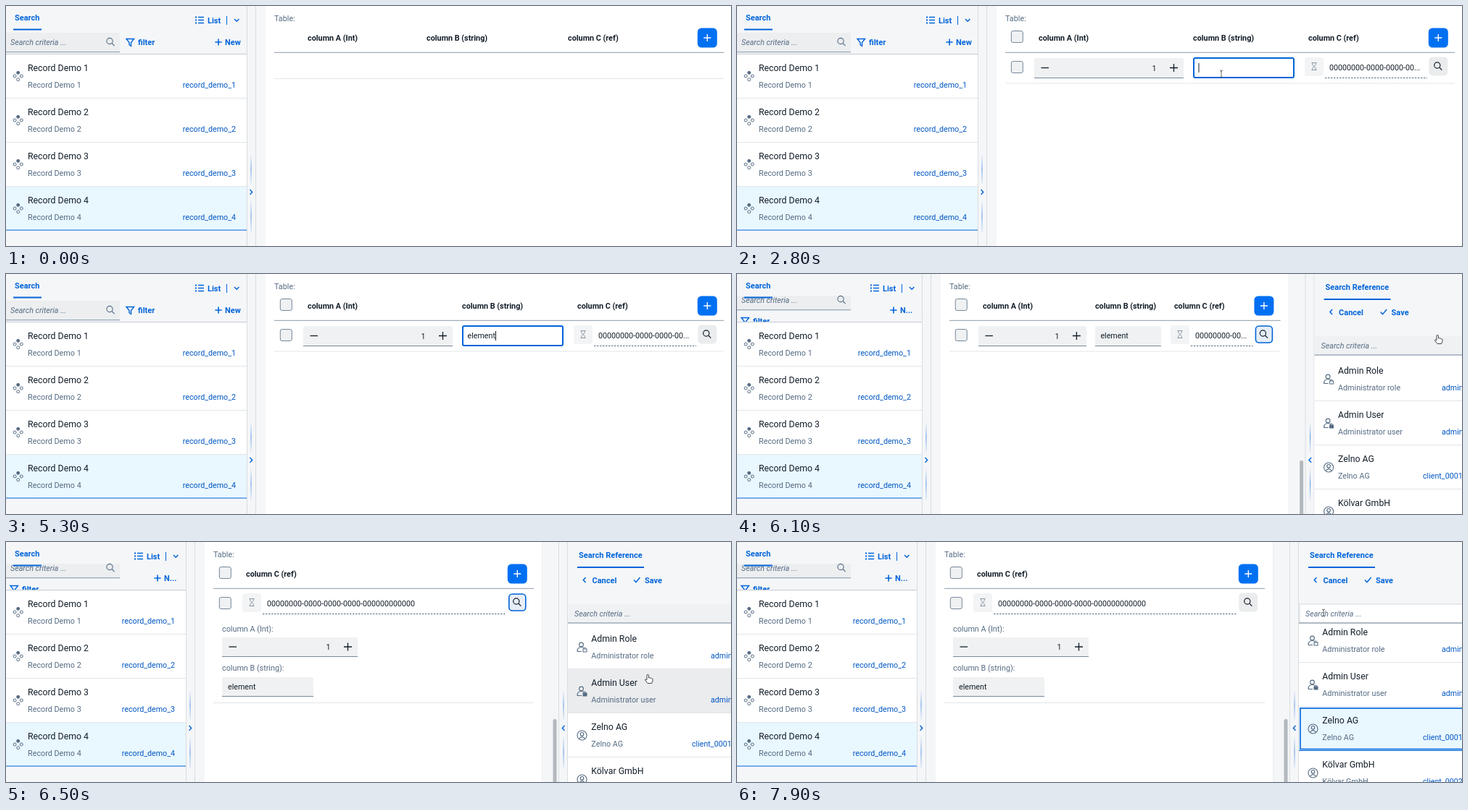
An HTML page for the animation above (8 s loop, 1000 by 332 pixels).

```html
<!DOCTYPE html>
<html lang="en">
<head>
<meta charset="utf-8">
<title>Table editor</title>
<style>
html, body { margin: 0; width: 100%; height: 100%; overflow: hidden; background: #fff; }
svg { display: block; width: 1000px; height: 332px; }
text { font: 10.7px Roboto, sans-serif; fill: #131e29; white-space: pre; }
.title { font-size: 12.3px; }
.sub { font-size: 10.8px; fill: #556b82; }
.link { fill: #0057c2; }
.bold { font-weight: 700; font-size: 10.8px; }
.action { font-weight: 700; font-size: 11px; fill: #0064d9; }
.hint { font-style: italic; fill: #556b82; }
.end { text-anchor: end; }
</style>
</head>
<body>
<svg id="stage" viewBox="0 0 1000 332"></svg>
<script>
const LOOP = 8000, STEP = 100;
const BLUE = '#0064d9', INK = '#131e29', GREY = '#556b82', PANEL = '#f5f6f8', FIELD = '#eff1f2', RULE = '#e3e5e8';
const ZEROS = '00000000-0000-0000-0000-000000000000';
const stage = document.getElementById('stage');

const clamp = v => Math.max(0, Math.min(1, v));
const mix = (a, b, p) => a + (b - a) * p;
const smooth = p => p * p * (3 - 2 * p);

const text = (x, y, s, cls = '') => `<text x="${x}" y="${y}" class="${cls}">${s}</text>`;
const rect = (x, y, w, h, fill, more = '') => `<rect x="${x}" y="${y}" width="${w}" height="${h}" fill="${fill}" ${more}/>`;
const path = (d, color = BLUE, w = 1.4, more = 'fill="none"') => `<path d="${d}" stroke="${color}" stroke-width="${w}" ${more}/>`;
const hline = (x1, x2, y, color = RULE, w = 1, more) => path(`M${x1} ${y}H${x2}`, color, w, more);
const vline = (x, y1, y2, color = RULE, w = 1) => path(`M${x} ${y1}V${y2}`, color, w);
const circle = (x, y, r, color, fill = 'none', w = 1.1) => `<circle cx="${x}" cy="${y}" r="${r}" stroke="${color}" stroke-width="${w}" fill="${fill}"/>`;
const plus = (x, y, r, color, w) => path(`M${x - r} ${y}h${2 * r}M${x} ${y - r}v${2 * r}`, color, w);
const lens = (x, y, color, w = 1.2) => circle(x - 1, y - 1, 4.1, color, 'none', w) + path(`M${x + 2} ${y + 2}l3.6 3.6`, color, w);

// Pointer stops: time, x, y, shape shown until the next stop
const stops = [
  [200, 703, 285, 'arrow'], [1000, 967, 47, 'hand'], [1225, 967, 47, 'arrow'], [2100, 604, 85, 'hand'],
  [2300, 604, 85, 'arrow'], [2700, 668, 94, 'beam'], [4600, 668, 94, ''],
  [5600, 700, 96, 'arrow'], [5800, 966, 84, 'hand'], [6150, 966, 84, 'hand'], [6500, 885, 183, 'hand'],
  [7000, 870, 281, 'hand'], [7200, 870, 281, 'hand'], [7900, 809, 98, 'beam']
];
function pointerAt(t) {
  const i = stops.findLastIndex(s => s[0] <= t);
  if (i < 0) return { x: -9, y: -9, shape: '' };
  const a = stops[i], b = stops[i + 1] || a;
  const p = smooth(clamp((t - a[0]) / (b[0] - a[0] || 1)));
  return { x: mix(a[1], b[1], p), y: mix(a[2], b[2], p), shape: a[3] };
}
const shapes = {
  arrow: path('M0 0V9.5L2.3 7.5L3.8 11L5.3 10.3L3.8 7H6.8Z', '#fff', .7, 'fill="#111"'),
  hand: path('M-1 1Q.3-.6 1.4 1V5Q3 4 3.6 5.2Q5 4.6 5.5 5.9Q7 5.6 7 7V9L5.6 12.5H0L-3.6 7.8Q-3.6 6-1 7.6Z', '#333', .9, 'fill="#fff"'),
  beam: path('M-2-5Q0-5 0-3.5Q0-5 2-5M0-4V4M-2 5Q0 5 0 3.5Q0 5 2 5', '#555', .9)
};
const pointer = m => m.shape ? `<g transform="translate(${m.x} ${m.y})">${shapes[m.shape]}</g>` : '';

function splitter(x, dir) {
  const bar = (y, h) => rect(x - .5, y, 1, h, 'url(#fade)');
  return bar(205, 41) + bar(268, 45) + path(`M${x - 1.5 * dir} 254l${3.2 * dir} 3.4l${-3.2 * dir} 3.4`, BLUE, 1.4);
}

function leftPanel(L) {
  const wrapped = L < 310, dy = wrapped ? -14 : 0;
  let s = rect(0, 0, L, 332, PANEL)
    + rect(0, 37 + dy, 157, 27, '#eceef0') + hline(0, 157, 63.7 + dy, '#8396a8')
    + rect(0, 0, L, 30, PANEL)
    + text(6, 54 + dy, 'Search criteria ...', 'hint') + lens(144, 49.5 + dy, GREY, 1.1);
  const fx = wrapped ? 6 : 166, fy = wrapped ? 65 : 50;
  s += path(`M${fx} ${fy - 4.5}h10.5l-4 5v5l-2.5-1.8v-3.2z`, BLUE, 1.4) + text(fx + 16, fy + 4, 'filter', 'action');
  s += text(12, 20, 'Search', 'action') + rect(10, 31.5, 39, 2, BLUE);
  for (const y of [15.5, 19.5, 23.5]) s += rect(L - 71, y - 1, 2, 2, BLUE) + hline(L - 67, L - 59, y, BLUE, 1.5);
  s += text(L - 54, 23.5, 'List', 'action') + vline(L - 27.5, 14, 26, BLUE, 1)
    + path(`M${L - 17} 18l3.2 3.2l3.2-3.2`, BLUE, 1.5)
    + plus(L - 39, 50, 4.6, BLUE, 1.6) + text(L - 30, 54, wrapped ? 'N...' : 'New', 'action');
  for (let i = 0; i < 4; i++) {
    const y = 66.5 + i * 61, name = `Record Demo ${i + 1}`;
    s += rect(0, y, L, 61, i == 3 ? '#e9f7ff' : '#fff') + hline(0, L, y, i ? RULE : '#c3cbd3')
      + circle(16.7, y + 25.8, 2, GREY, GREY, 1) + circle(12.1, y + 30.5, 2, GREY, 'none', 1)
      + circle(21.3, y + 30.5, 2, GREY, 'none', 1) + circle(16.7, y + 35.2, 2, GREY, 'none', 1)
      + text(30, y + 23.5, name, 'title') + text(30, y + 46, name, 'sub')
      + text(L - 15, y + 46, `record_demo_${i + 1}`, 'link end');
  }
  return s + rect(0, 310.5, L, 1, PANEL) + hline(0, L, 310, BLUE) + rect(L, 0, 26, 332, PANEL)
    + vline(L + .5, 0, 332, '#d9dde1') + vline(L + 12.5, 0, 332, '#d9dde1') + splitter(L + 6, 1);
}

const checkbox = (x, y) => rect(x - 8, y - 8, 16, 16, FIELD, 'rx="2.5" stroke="#75879a"');
const input = (x, y, w, h, focus) => focus
  ? rect(x + 1, y, w - 2, h - 1, '#fff', `rx="2" stroke="${BLUE}" stroke-width="2"`)
  : rect(x, y, w, h, FIELD, 'rx="2"') + hline(x, x + w, y + h - .5, '#75879a');
const stepper = (x, y, w, h, value, focus) => {
  const cy = y + h / 2 - .5, end = x + w - 13.5;
  return input(x, y, w, h, focus) + hline(x + 9.5, x + 20, cy, INK, 1.3)
    + text(end - 24, cy + 4, value, 'end') + plus(end, cy, 5.5, INK, 1.3);
};
const hourglass = x => rect(x, 71, 26, 26, '#f3f4f5', 'rx="4"')
  + path(`M${x + 9.5} 78.5h7M${x + 9.5} 88.5h7M${x + 10.5} 79q0 3 2.5 4.5q-2.5 1.5-2.5 4.5M${x + 15.5} 79q0 3-2.5 4.5q2.5 1.5 2.5 4.5`, '#8b98a5', 1);
const addButton = (x, focus) => (focus
  ? rect(x - 13, 31, 26, 26, '#fff', `rx="5.5" stroke="${BLUE}" stroke-width="1.4"`) + rect(x - 11.3, 32.7, 22.6, 22.6, BLUE, 'rx="4"')
  : rect(x - 13.5, 30.5, 27, 27, '#0070f2', 'rx="5.5"')) + plus(x, 44, 5, '#fff', 1.4);
const lookup = (x, focus) => (focus
  ? rect(x - 11.5, 72, 23, 23, '#e6edf4', `rx="4.5" stroke="${BLUE}" stroke-width="1.6"`)
  : rect(x - 13, 70.5, 26, 26, '#eaecee', 'rx="5"')) + lens(x - .5, 83, INK, 1.2);

function typed(t) {
  const times = [3600, 3700, 3800, 4100, 4200, 4200, 4300];
  return 'element'.slice(0, times.filter(k => k <= t).length);
}
const advance = { e: 5.7, l: 2.6, m: 9.4, n: 5.9, t: 3.5 };

function table(t, L, R, k) {
  const C = L + 26, end = R - 47, x0 = C + 12;
  let s = rect(C, 0, R - 35 - C, 332, '#fff') + text(x0, 21.3, 'Table:', 'sub')
    + hline(x0, end, 64.3, '#a3adb8', 1.2) + addButton(end - 22.7, t >= 1100 && t < 2200);
  if (t < 1300) return s + text(416, 48, 'column A (Int)', 'bold') + text(580, 48, 'column B (string)', 'bold')
    + text(775, 48, 'column C (ref)', 'bold') + hline(x0, end, 100.5);

  s += checkbox(C + 28.3, 42.5) + checkbox(C + 28.3, 84.5) + lookup(end - 22.7, t >= 5800 && t < 7200);
  const value = t < 2200 ? 0 : 1, word = typed(t);
  if (k > .95) return s + text(C + 57, 48, 'column C (ref)', 'bold') + hourglass(C + 52)
    + text(C + 86, 89, ZEROS) + hline(C + 80, end - 38, 99.5, GREY, 1, 'stroke-dasharray="2.5 1.5"')
    + text(C + 24, 124, 'column A (Int):', 'sub') + stepper(C + 24, 132, 187, 27, value)
    + text(C + 24, 178, 'column B (string):', 'sub') + input(C + 24, 187, 126, 27) + text(C + 32, 203.5, word)
    + hline(x0, end, 222.5);

  const q = k / .917, bx = mix(629, 494, q), cx = mix(783, 598, q), focus = t >= 2700 && t < 5700;
  const room = end - 38 - cx - 34, count = Math.floor((room - 13) / 5.8);
  s += text(C + 58, 48, 'column A (Int)', 'bold') + text(bx, 48, 'column B (string)', 'bold') + text(cx + 5, 48, 'column C (ref)', 'bold')
    + stepper(C + 52, 72, mix(206, 149, q), 28, value, t >= 2200 && t < 2700)
    + input(bx, 72, mix(140, 91, q), 28, focus) + text(bx + 7.5, 89, word)
    + hourglass(cx) + text(cx + 34, 89, ZEROS.slice(0, count) + '...')
    + hline(cx + 28, end - 38, 99.5, GREY, 1, 'stroke-dasharray="2.5 1.5"') + hline(x0, end, 107);
  const caretOn = focus && !(t >= 3200 && t < 3600) && !(t >= 4800 && t < 5300);
  return caretOn ? s + vline(bx + 8 + [...word].reduce((w, c) => w + advance[c], 0), 79, 92, INK, 1) : s;
}

const people = [
  ['Admin Role', 'Administrator role', 'admin'], ['Admin User', 'Administrator user', 'admin'],
  ['Zelno AG', 'Zelno AG', 'client_0001'], ['Kölvar GmbH', 'Kölvar GmbH', 'client_0002']
];
function personIcon(x, y, kind) {
  if (kind > 1) return circle(x, y, 6.5, GREY) + circle(x, y - 1.7, 2.3, GREY) + path(`M${x - 4} ${y + 4.6}q4-5 8 0`, GREY, 1.1);
  return circle(x - 1, y - 3.5, 2.9, GREY) + path(`M${x - 6.5} ${y + 6}q0-6 5.5-6q3 0 4 1.5M${x - 6.5} ${y + 6}h6`, GREY, 1.2)
    + rect(x + 1.5, y + 2.5, 5, 4, kind ? GREY : 'none', `stroke="${GREY}"`) + path(`M${x + 2.7} ${y + 2.3}v-1q1.3-2 2.6 0v1`, GREY, 1);
}

function rightPanel(t, R, m) {
  const scroll = 9 * clamp((t - 6600) / 400);
  let s = rect(R - 35, 0, 1035 - R, 332, PANEL) + vline(R - 35.5, 0, 332, '#eceef0')
    + rect(R - 20.5, t < 6200 ? 258 : 245, 5, 90, '#b3b8be', 'rx="2"')
    + vline(R - 12.5, 0, 332, '#d9dde1') + vline(R - .5, 0, 332, '#d9dde1') + splitter(R - 6, -1)
    + rect(R, 112, 1000 - R, 220, '#fff');
  people.forEach(([name, role, id], i) => {
    const y = 115 + i * 61 - scroll, chosen = i == 2 && t >= 7200;
    const hover = m.x > R && m.y > Math.max(y, 112) && m.y < y + 61;
    s += rect(R, y, 1000 - R, 61, chosen ? '#e9f7ff' : hover ? '#eaecee' : '#fff')
      + hline(R, 1000, y + 60.5, chosen ? BLUE : RULE);
    if (chosen) s += rect(R + 2, y + 2, 300, 56.5, 'none', `stroke="${BLUE}" stroke-width="1.6"`);
    s += personIcon(R + 19.5, y + 30.5, i) + text(R + 32.3, y + 22.5, name, 'title') + text(R + 32.3, y + 45.5, role, 'sub')
      + text(id == 'admin' ? 972 : 946, y + 45.5, id, 'link');
  });
  const active = m.x > R && m.y > 86 && m.y < 112;
  s += rect(R, 0, 1000 - R, 112.5, PANEL)
    + rect(R + 1, 86, 300, 26, active ? '#fff' : '#eff1f3', active ? 'stroke="#d5dade"' : '') + hline(R, 1000, 112, '#75879a');
  return s + text(R + 9, 102.5, 'Search criteria ...', 'hint')
    + text(R + 15, 22.2, 'Search Reference', 'bold action') + rect(R + 13, 34, 92, 2, BLUE)
    + path(`M${R + 24.5} 49l-3.2 3.5l3.2 3.5`, BLUE, 1.5) + text(R + 33.5, 56.5, 'Cancel', 'action')
    + path(`M${R + 91} 52.5l3 3.2l5.5-6.7`, BLUE, 1.5) + text(R + 106, 56.5, 'Save', 'action');
}

const fade = `<defs><linearGradient id="fade" x2="0" y2="1"><stop stop-color="${BLUE}" stop-opacity="0"/>`
  + `<stop offset=".5" stop-color="${BLUE}" stop-opacity=".65"/><stop offset="1" stop-color="${BLUE}" stop-opacity=".1"/></linearGradient></defs>`;

let shown = -1;
function frame(now) {
  const t = Math.floor(now % LOOP / STEP) * STEP;
  if (t != shown) {
    shown = t;
    const k = 1 - (1 - clamp((t - 5800) / 600)) ** 3.6;
    const L = mix(332, 248, k), R = mix(1037, 775, k), m = pointerAt(t);
    stage.innerHTML = fade + leftPanel(L) + table(t, L, R, k) + (k ? rightPanel(t, R, m) : '') + pointer(m);
  }
  requestAnimationFrame(frame);
}
frame(0);
</script>
</body>
</html>
```
